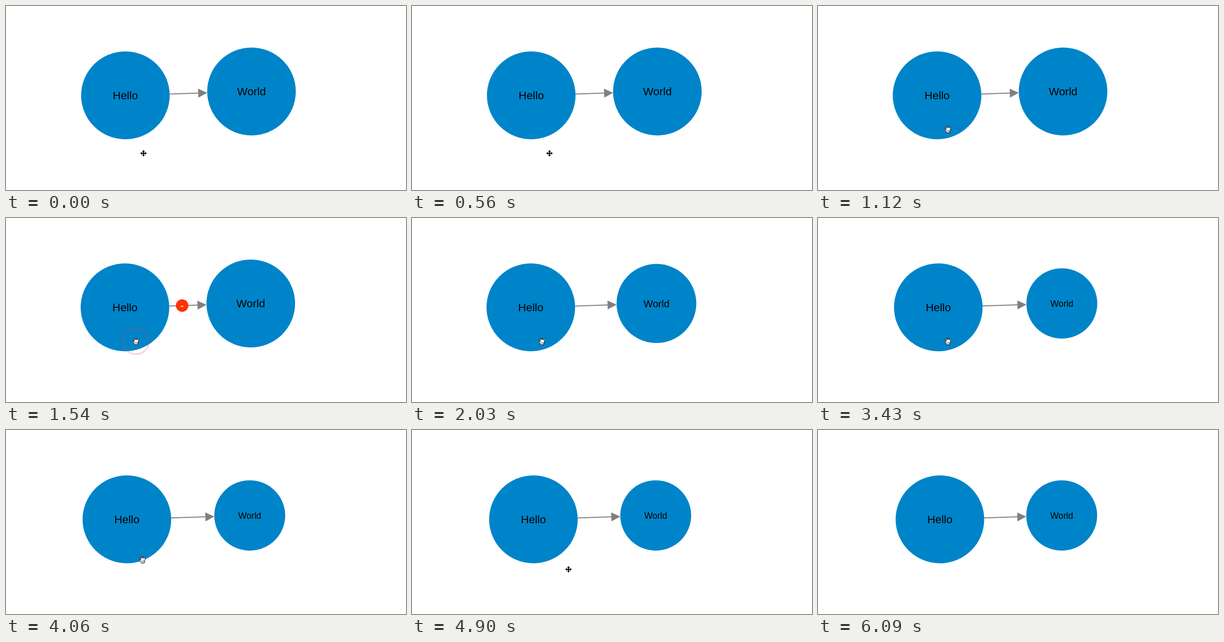
Animation, 800 px wide and 371 px high, one loop 6.16 s. Source, as an HTML page:

```html
<!DOCTYPE html>
<html lang="en">
<head>
<meta charset="utf-8">
<title>Hello World graph</title>
<style>
  html, body { margin: 0; width: 100%; height: 100%; overflow: hidden; background: #fff; }
  svg { display: block; width: 800px; height: 371px; }
  text { font-family: "Liberation Sans", Arial, sans-serif; text-anchor: middle; }
</style>
</head>
<body>
<svg viewBox="0 0 800 371">
  <line id="edge" stroke="#808080" stroke-width="2"/>
  <path id="arrow" d="M0 0L-18 -9V9Z" fill="#808080"/>
  <g id="hello"><circle fill="#0084c9"/><text>Hello</text></g>
  <g id="world"><circle fill="#0084c9"/><text>World</text></g>
  <g id="badge">
    <circle r="12.5" fill="#ff3300"/>
    <text y="7" font-size="22" fill="#fff">-</text>
  </g>
  <circle id="ring" fill="none" stroke="#e0443c" stroke-width="2.6"/>
  <path id="move" fill="#000" stroke="#fff" stroke-width="1.6" paint-order="stroke" stroke-linejoin="round"/>
  <g id="hand" stroke="#000" stroke-linejoin="round" stroke-linecap="round">
    <path fill="#fff" d="M-2.6 6.8Q-4 3.6 -6.3 1.2C-7 -.2 -5.4 -1 -3.2 1.3L-4.9 -3.2C-5.4 -4.8 -3.5 -5.4 -2.2 -2.2L-2.5 -5.2C-2.6 -6.9 -.6 -7.1 -.1 -2.8L.5 -5.5C.9 -7 2.7 -6.6 2.2 -2L3.5 -3.9C4.4 -5.2 6 -4.3 5.4 -2.9Q4.6 3 3.3 6.8Z"/>
    <path fill="none" stroke-width=".7" d="M-1.2 2.4V4.8M.8 2.4V4.8M2.7 2.4V4.8"/>
  </g>
</svg>
<script>
const LOOP = 6160, STEP = 70;
const RADIUS = 88.6;
const CLICKS = [1330, 2590];
const RING_TIME = 280, FLIGHT_DELAY = 35, FLIGHT_TIME = 505;
const CURSOR_GONE = 5600;

const el = id => document.getElementById(id);
const [edge, arrow, hello, world, badge, ring, move, hand] =
  ["edge", "arrow", "hello", "world", "badge", "ring", "move", "hand"].map(el);

function set(node, attrs) {
  for (const key in attrs) node.setAttribute(key, attrs[key]);
}
const show = (node, visible) => set(node, { visibility: visible ? "visible" : "hidden" });
const place = (node, x, y, angle = 0) => set(node, { transform: `translate(${x} ${y}) rotate(${angle})` });
const progress = (t, start, duration) => Math.min(1, Math.max(0, (t - start) / duration));

// The layout relaxes: Hello leans left, then settles to the right; World eases left.
const helloX = t => 238.8 - 1.2 * progress(t, 0, 2030) + 7.5 * (1 - Math.exp(-Math.max(0, t - 2350) / 2100));
const worldX = t => 487.4 + 3.6 * Math.exp(-((t / 2150) ** 2));

// The cursor enters Hello, leaves it, drifts up and drops away.
function cursorAt(t) {
  const enter = progress(t, 700, 400), leave = progress(t, 3920, 490);
  const drift = progress(t, 4410, 490), drop = progress(t, 5180, 420);
  return {
    x: 275 - 15 * enter + 46 * leave + 7 * (drift + drop),
    y: 297 - 48.6 * enter + 45 * leave - 12.4 * drift + 66 * drop
  };
}

// One arrow per direction, each a quarter turn from the last.
function fourArrows() {
  const arm = [[-1, -1], [-1, -3.3], [-3, -3.3], [0, -6.5], [3, -3.3], [1, -3.3]];
  const points = [];
  for (let turn = 0; turn < 4; turn++) {
    const c = Math.cos(turn * Math.PI / 2), s = Math.sin(turn * Math.PI / 2);
    points.push(...arm.map(([x, y]) => [x * c - y * s, x * s + y * c]));
  }
  return "M" + points.join("L") + "Z";
}

function drawNode(group, { x, y, r }) {
  place(group, x, y);
  set(group.firstChild, { r });
  set(group.lastChild, { "font-size": r / 4, y: r * 0.092 });
}

function render(t) {
  const shrinks = CLICKS.filter(click => t >= click + FLIGHT_DELAY + FLIGHT_TIME).length;
  const from = { x: helloX(t), y: 180.2, r: RADIUS };
  const to = { x: worldX(t), y: 172.3, r: RADIUS * (1 - shrinks / 10) };
  drawNode(hello, from);
  drawNode(world, to);

  const angle = Math.atan2(to.y - from.y, to.x - from.x);
  const ux = Math.cos(angle), uy = Math.sin(angle);
  const x1 = from.x + ux * from.r, y1 = from.y + uy * from.r;
  const x2 = to.x - ux * to.r, y2 = to.y - uy * to.r;
  set(edge, { x1, y1, x2: x2 - ux * 16, y2: y2 - uy * 16 });
  place(arrow, x2, y2, angle * 180 / Math.PI);

  const sinceClick = t - CLICKS.filter(click => t >= click).pop();
  const flight = (sinceClick - FLIGHT_DELAY) / FLIGHT_TIME;
  const flying = flight >= 0 && flight < 1;
  show(badge, flying);
  if (flying) place(badge, x1 + (x2 - x1) * flight, y1 + (y2 - y1) * flight);

  const { x, y } = cursorAt(t);
  const spread = sinceClick / RING_TIME;
  show(ring, spread < 1);
  if (spread < 1) set(ring, { cx: x, cy: y, r: 15 + 15 * spread, opacity: 1 - spread });

  const inside = Math.hypot(x - from.x, y - from.y) < from.r;
  show(hand, inside);
  show(move, !inside && t < CURSOR_GONE);
  place(hand, x, y);
  place(move, x, y);
}

set(move, { d: fourArrows() });
const start = performance.now();
function tick() {
  const t = (performance.now() - start) % LOOP;
  render(Math.floor(t / STEP) * STEP);
  requestAnimationFrame(tick);
}
tick();
</script>
</body>
</html>
```
